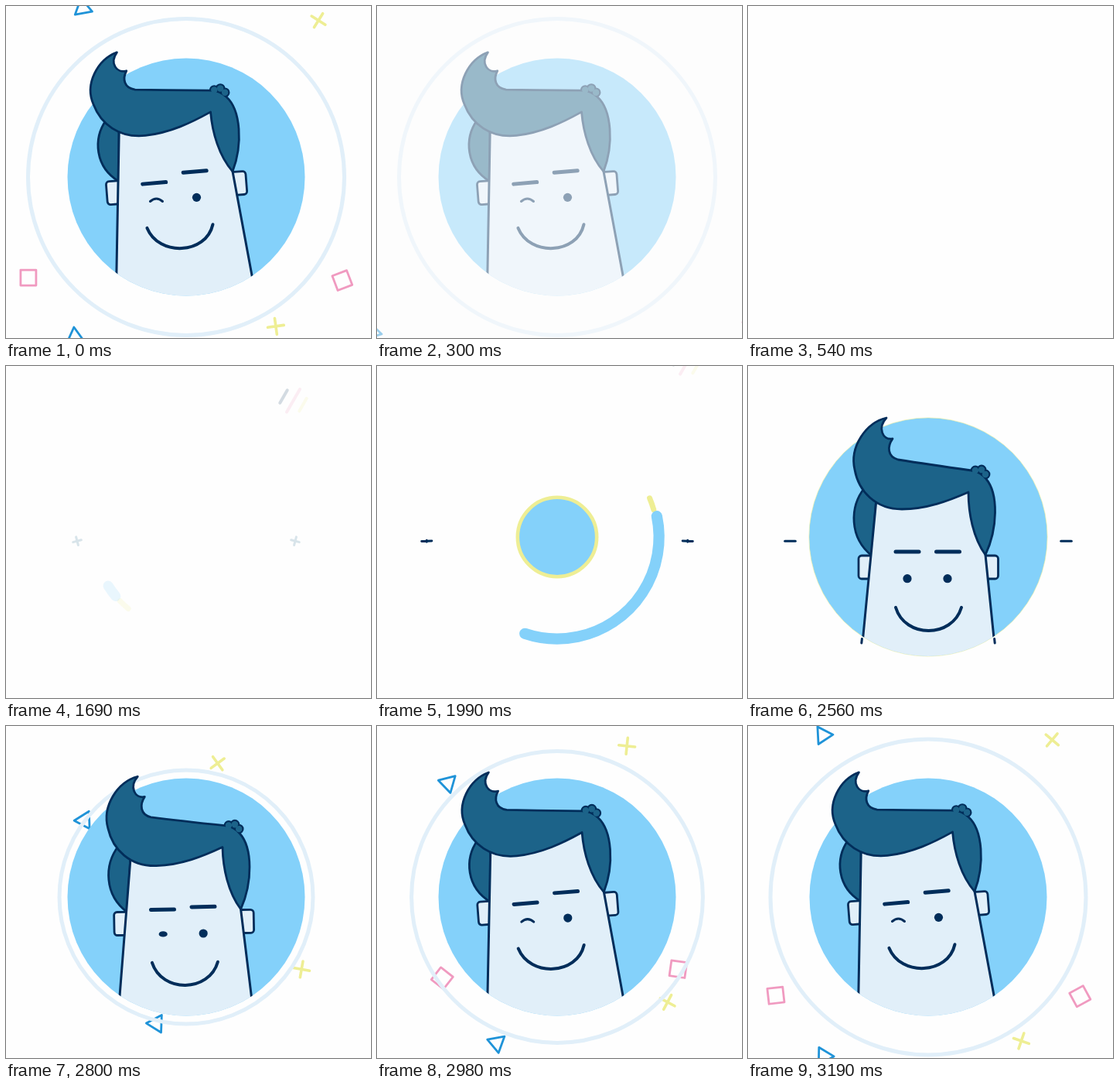
Recreate the animation shown at these times as an HTML page with a canvas. Size 472 by 429 pixels, loop 3220 ms.

```html
<!DOCTYPE html>
<html>
<head>
<meta charset="utf-8">
<title>Winking avatar</title>
<style>
  html, body { margin: 0; width: 100%; height: 100%; overflow: hidden; background: #fefefe; }
  canvas { display: block; }
</style>
</head>
<body>
<canvas id="stage" width="472" height="429"></canvas>
<script>
const ctx = document.getElementById('stage').getContext('2d');
const W = 472, H = 429, LOOP = 3220, STEP = 30;
const CX = 233, CY = 221, RAD = Math.PI / 180;
const PAPER = '#fefefe', NAVY = '#002d5a', SKY = '#84d1fa', SKIN = '#e1eff9',
      HAIR = '#1c6389', YELLOW = '#eeee94', PINK = '#f09ac0', BLUE = '#1f93d8';

const KINDS = {
  triangle: { color: BLUE, turn: 12.3 },
  plus: { color: YELLOW, turn: 15.4 },
  square: { color: PINK, turn: 2.7 }
};

// State at 2980 ms, with the change over the next 240 ms in travel and spin
const CONFETTI = [
  { kind: 'triangle', angle: 226.2, radius: 204, travel: 52, rotation: -164, spin: 184 },
  { kind: 'triangle', angle: 112.5, radius: 204, travel: 48, rotation: -160, spin: 184 },
  { kind: 'plus', angle: -65.2, radius: 215, travel: 50, rotation: 96, spin: -64 },
  { kind: 'plus', angle: 43.6, radius: 197, travel: 28, rotation: 208, spin: -216 },
  { kind: 'square', angle: 144.8, radius: 182, travel: 60, rotation: -52, spin: 52 },
  { kind: 'square', angle: 30.8, radius: 182, travel: 60, rotation: -82, spin: 61 }
];

const mix = (a, b, u) => a + (b - a) * u;
const clamp = u => Math.min(1, Math.max(0, u));
const smooth = u => u * u * (3 - 2 * u);

// Eased value through [time, value] keys
function track(t, ...keys) {
  if (t <= keys[0][0]) return keys[0][1];
  for (let i = 1; i < keys.length; i++) {
    const [t0, a] = keys[i - 1], [t1, b] = keys[i];
    if (t < t1) return mix(a, b, smooth((t - t0) / (t1 - t0)));
  }
  return keys[keys.length - 1][1];
}

function stroke(color, width) {
  ctx.strokeStyle = color;
  ctx.lineWidth = width;
  ctx.stroke();
}

function fill(color) {
  ctx.fillStyle = color;
  ctx.fill();
}

function curve(p) {
  ctx.beginPath();
  ctx.moveTo(p[0], p[1]);
  for (let i = 2; i < p.length; i += 6) ctx.bezierCurveTo(...p.slice(i, i + 6));
}

function poly(p) {
  ctx.beginPath();
  for (let i = 0; i < p.length; i += 2) ctx.lineTo(p[i], p[i + 1]);
}

function arc(r, from = 0, to = 360, x = CX, y = CY) {
  ctx.beginPath();
  ctx.arc(x, y, Math.max(0, r), from * RAD, to * RAD);
}

function plus(size, upright = size) {
  ctx.beginPath();
  ctx.moveTo(-size, 0);
  ctx.lineTo(size, 0);
  if (upright > 0.3) {
    ctx.moveTo(0, -upright);
    ctx.lineTo(0, upright);
  }
}

function drawStreaks(t) {
  const u = clamp((t - 1690) / 330);
  ctx.globalAlpha = clamp((t - 1660) / 180) * (1 - u * u);
  [NAVY, PINK, YELLOW].forEach((color, i) => {
    const half = i === 1 ? 17 : 9.5;
    ctx.save();
    ctx.translate(359 + 12.5 * i + 32 * u, 39.5 + 5.3 * i - 54 * u);
    ctx.rotate(-60 * RAD);
    plus(half, 0);
    stroke(color, 4);
    ctx.restore();
  });
  ctx.globalAlpha = 1;
}

function drawDashes(t) {
  if (t >= 2740) return;
  const reach = track(t, [1690, 141], [2200, 185], [2320, 193], [2560, 178.5], [2740, 165]);
  const size = track(t, [1690, 5.5], [2100, 6.8], [2600, 6.8], [2740, 0]);
  const upright = track(t, [1690, 5.5], [2100, 0]);
  const spin = track(t, [1690, 15], [2100, 0]);
  const from = track(t, [2020, 176], [2200, 175.5], [2380, 158]);
  const to = track(t, [2020, 176], [2200, 159], [2380, 158]);
  for (const side of [-1, 1]) {
    ctx.save();
    ctx.globalAlpha = clamp((t - 1660) / 180);
    ctx.translate(CX + side * reach, CY + 5.2);
    ctx.rotate(side * spin * RAD);
    plus(size, upright);
    stroke(mixedNavy(upright), 3);
    ctx.restore();
    if (from - to > 0.5) {
      if (side < 0) arc(179.5, to, from);
      else arc(179.5, 180 - from, 180 - to);
      stroke(NAVY, 3);
    }
  }
}

const mixedNavy = upright => upright > 3 ? HAIR : NAVY;

function drawSwirl(t) {
  if (t >= 2380) return;
  const r = track(t, [1690, 119], [2200, 139], [2380, 140]);
  const head = track(t, [1690, 148], [2200, 656], [2380, 690]);
  const tail = track(t, [1690, 140], [2200, 470], [2380, 690]);
  ctx.globalAlpha = clamp((t - 1660) / 180);
  arc(r - track(t, [1690, 0], [2200, 3]), tail - 11, tail - 4);
  stroke(YELLOW, 7);
  arc(r, tail, head);
  stroke(SKY, track(t, [1690, 13], [2200, 15], [2380, 4]));
  ctx.globalAlpha = 1;
}

function drawConfetti(t) {
  if (t < 2770) return;
  const u = (t - 2980) / 240;
  for (const bit of CONFETTI) {
    const { color, turn } = KINDS[bit.kind];
    const r = bit.radius + bit.travel * u;
    const angle = (bit.angle + turn * u) * RAD;
    ctx.save();
    ctx.translate(CX + r * Math.cos(angle), CY + r * Math.sin(angle));
    ctx.rotate((bit.rotation + bit.spin * u) * RAD);
    if (bit.kind === 'plus') {
      plus(10.5);
    } else if (bit.kind === 'square') {
      ctx.beginPath();
      ctx.rect(-10, -10, 20, 20);
    } else {
      poly([13, 0, -6.5, 11.3, -6.5, -11.3]);
      ctx.closePath();
    }
    stroke(color, bit.kind === 'plus' ? 3.6 : 2.8);
    ctx.restore();
  }
  arc(154 + 50.5 * (1 - Math.pow(1 - clamp((t - 2740) / 480), 1.65)));
  stroke(SKIN, 5);
}

function drawDisc(t) {
  const r = track(t, [1840, 0], [2200, 133], [2380, 158], [2560, 154], [2740, 153.5]);
  if (r <= 0) return r;
  arc(r);
  fill(SKY);
  const rim = 4.6 * clamp((2610 - t) / 410);
  if (rim > 0) {
    arc(r + rim / 4);
    stroke(YELLOW, rim);
  }
  return r;
}

// Bends the upright head: the top swings left, the right side lifts
function bend(points, tilt) {
  return points.map((v, i) => {
    const x = points[i & ~1], y = points[i | 1];
    const dx = -5.5 - 0.08 * (350 - y) - 0.08 * Math.max(0, 160 - y);
    const dy = -19.5 - (0.12 - 0.0004 * (y - 150)) * (x - 230) - 0.05 * (y - 157);
    return v + tilt * (i % 2 ? dy : dx);
  });
}

function drawHead(t, discRadius) {
  if (t < 2230) return;
  const tilt = track(t, [2700, 0], [3010, 1]);
  const rise = track(t, [2230, 330], [2410, -37], [2560, 0]);
  const at = (...points) => bend(points, tilt);

  ctx.save();
  arc(discRadius);
  ctx.rect(0, 0, W, CY);
  ctx.clip();
  ctx.translate(0, rise);

  for (const x of [152.5, 314]) {
    ctx.save();
    ctx.translate(...at(x, 260));
    ctx.rotate(-4.5 * tilt * RAD);
    ctx.beginPath();
    ctx.roundRect(-9.5, -15, 19, 30, 4);
    fill(SKIN);
    stroke(NAVY, 2.8);
    ctx.restore();
  }

  curve(at(151,157, 131,182, 131,222, 160,245, 162,220, 164,195, 166,170));
  fill(HAIR);
  stroke(NAVY, 2.8);

  const leftNeck = at(166,172, 142,420), rightNeck = at(325,420, 307,244);
  poly([...leftNeck, ...rightNeck, ...at(285,155)]);
  fill(SKIN);
  for (const side of [leftNeck, rightNeck]) {
    poly(side);
    stroke(NAVY, 3);
  }

  const curls = [at(294,135), at(302,134), at(307,140)];
  for (const [x, y] of curls) {
    arc(5, 0, 360, x, y);
    stroke(NAVY, 2.8);
  }
  curve(at(179,67, 153,73,131,104,138,134, 143,162,165,185,199,185,
    231,185,260,174,285,163, 285,190,291,222,307,244, 323,210,324,165,308,146,
    302,138,296,136,289,135, 260,131,225,126,194,121, 180,117,180,104,187,94,
    174,96,167,80,179,67));
  ctx.closePath();
  fill(HAIR);
  stroke(NAVY, 2.8);
  for (const [x, y] of curls) {
    arc(4.2, 0, 360, x, y);
    fill(HAIR);
  }

  const [bx1, by1, bx2, by2] = at(191,240, 221,240);
  poly([bx1, by1 + 10.5 * tilt, bx2, by2 + 10.5 * tilt]);
  stroke(NAVY, 5);
  poly(at(243.5,240, 273.5,240));
  stroke(NAVY, 5);

  const [lx, ly, rx, ry] = at(206,274.7, 258,274.7);
  arc(5.6, 0, 360, rx, ry);
  fill(NAVY);
  ctx.beginPath();
  if (tilt < 0.5) {
    ctx.ellipse(lx, ly, 5.6, mix(5.6, 1.5, tilt * 2), 0, 0, 2 * Math.PI);
    fill(NAVY);
  } else {
    ctx.moveTo(lx - 8, ly + 1.5);
    ctx.quadraticCurveTo(lx, ly - 5.5, lx + 8, ly + 1.5);
    stroke(NAVY, 3);
  }
  curve(at(191,312, 203,352, 264,352, 276,312));
  stroke(NAVY, 4);
  ctx.restore();

  // Ends of the neck lines below the disc
  const stub = clamp((t - 2440) / 60) * clamp((2720 - t) / 80);
  if (stub > 0) {
    ctx.globalAlpha = stub;
    for (const side of [-1, 1]) {
      poly([CX + side * 85.6, 352.5, CX + side * 86.2, 358]);
      stroke(NAVY, 3);
    }
    ctx.globalAlpha = 1;
  }
}

function draw(now) {
  const clock = now % LOOP;
  const base = clock < 540 ? 0 : 1690;
  const step = base + Math.floor((clock - base) / STEP) * STEP;
  const t = clock < 540 ? step + LOOP : step;

  ctx.fillStyle = PAPER;
  ctx.fillRect(0, 0, W, H);
  if (t < 1690) return;

  ctx.lineCap = ctx.lineJoin = 'round';
  drawStreaks(t);
  drawDashes(t);
  drawSwirl(t);
  drawConfetti(t);
  drawHead(t, drawDisc(t));

  // The finished scene fades away
  ctx.globalAlpha = clamp((t - LOOP) / 540);
  ctx.fillStyle = PAPER;
  ctx.fillRect(0, 0, W, H);
  ctx.globalAlpha = 1;
}

const start = performance.now();
function frame() {
  draw(performance.now() - start);
  requestAnimationFrame(frame);
}
frame();
</script>
</body>
</html>
```
